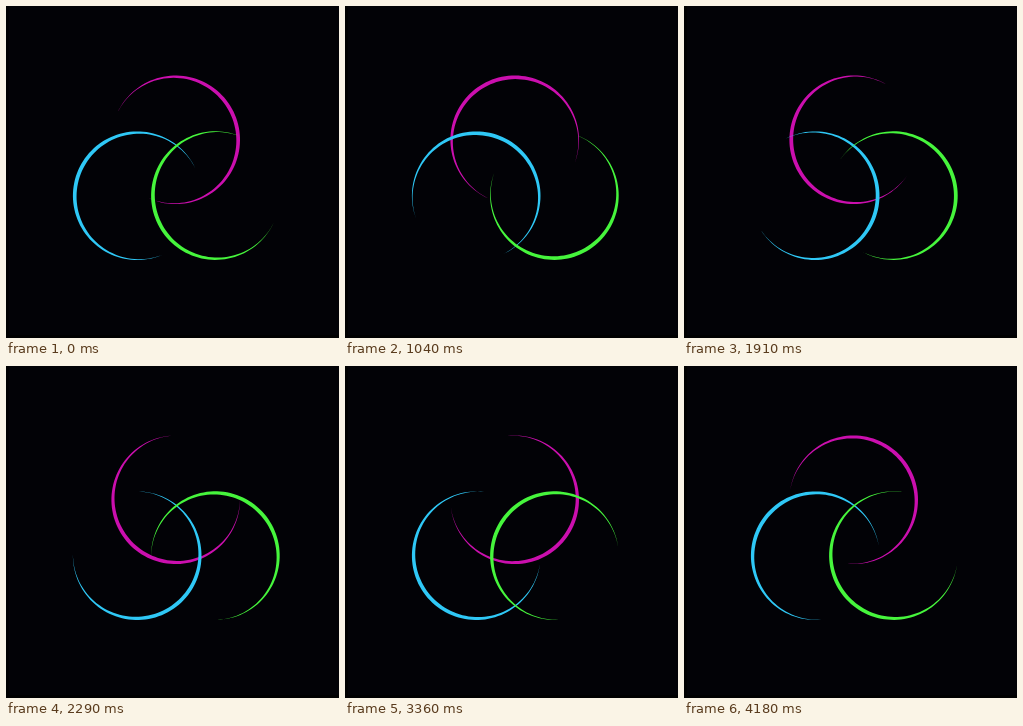
Write an HTML page that moves like this. It is 333 by 332 pixels and loops after 4270 ms.

```html
<!DOCTYPE html>
<html lang="en">
<head>
<meta charset="utf-8">
<title>Three rings loader</title>
<style>
  html, body { margin: 0; width: 100%; height: 100%; overflow: hidden; background: #000; }
  svg { display: block; width: 100%; height: 100%; }
</style>
</head>
<body>
<svg id="stage" viewBox="0 0 333 332" preserveAspectRatio="none">
  <rect x="3" width="330" height="329" fill="#020206"/>
</svg>
<script>
const LOOP = 4270;
const SPEED = 360 / 4000; // degrees per ms
const RADIUS = 64.3;
const REACH = 135;        // degrees from the thickest point to each tip
const THICK = 3.8;

// start, end and number of evenly spaced picture changes
const GROUPS = [
  [40, 550, 6], [660, 1140, 6], [1240, 1720, 6], [1820, 2290, 6],
  [2390, 2880, 6], [2980, 3440, 6], [3520, 3990, 6], [4090, 4180, 2]
];
const TICKS = [0, ...GROUPS.flatMap(([from, to, n]) =>
  Array.from({ length: n }, (_, i) => Math.round((from + (to - from) * i / (n - 1)) / 10) * 10))];

const RINGS = [
  { x: 169.7, y: 133.8, color: '#cb0fae', start: 340, dir: -1 },
  { x: 131.2, y: 189.7, color: '#2fc8f6', start: 200.5, dir: 1 },
  { x: 209.4, y: 189.6, color: '#46f53c', start: 159.5, dir: -1 }
];

// Crescent around the origin, thickest on the right, inner edge tapering to the tips
function crescent() {
  const tip = Math.cos(REACH * Math.PI / 180);
  const outer = [], inner = [];
  for (let deg = -REACH; deg <= REACH; deg += 3) {
    const a = deg * Math.PI / 180;
    const width = THICK * (Math.cos(a) - tip) / (1 - tip);
    const point = r => (r * Math.cos(a)).toFixed(2) + ' ' + (r * Math.sin(a)).toFixed(2);
    outer.push(point(RADIUS));
    inner.unshift(point(RADIUS - width));
  }
  return 'M' + [...outer, ...inner].join('L') + 'Z';
}

const stage = document.getElementById('stage');
const shape = crescent();
for (const ring of RINGS) {
  ring.path = document.createElementNS('http://www.w3.org/2000/svg', 'path');
  ring.path.setAttribute('d', shape);
  ring.path.setAttribute('fill', ring.color);
  stage.append(ring.path);
}

function draw(time) {
  const held = TICKS.findLast(tick => tick <= time);
  for (const { path, x, y, start, dir } of RINGS) {
    path.setAttribute('transform', `translate(${x} ${y}) rotate(${start + dir * SPEED * held})`);
  }
}

const begin = performance.now();
function frame() {
  draw((performance.now() - begin) % LOOP);
  requestAnimationFrame(frame);
}
frame();
</script>
</body>
</html>
```
